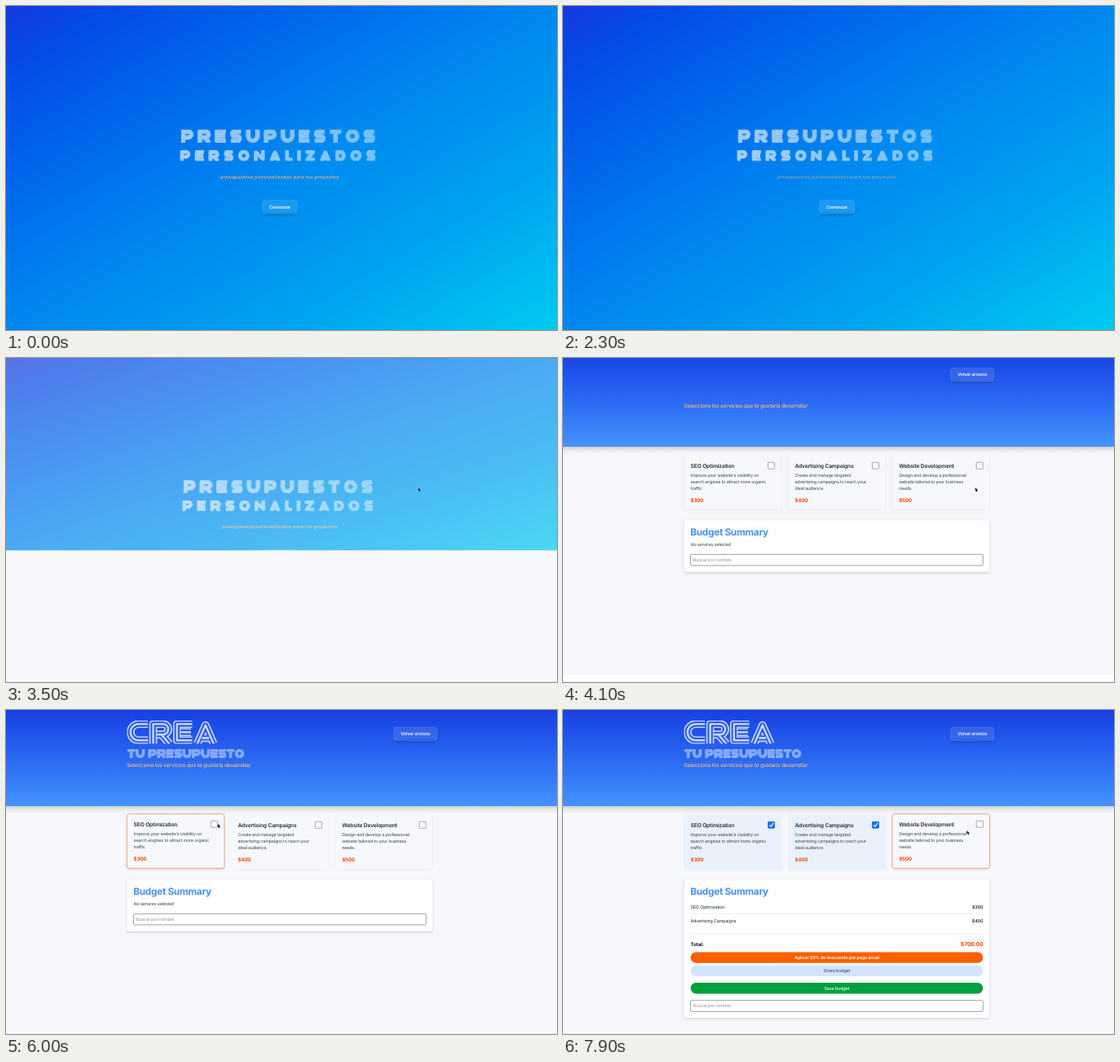
An HTML page that plays this animation: 676x398 px, repeating every 8000 ms.

```html
<!DOCTYPE html>
<html lang="es">
<head>
<meta charset="utf-8">
<title>Presupuestos personalizados</title>
<style>
html, body { margin: 0; width: 100%; height: 100%; overflow: hidden; background: #fff; }
svg { display: block; width: 676px; height: 398px; }
text {
  font-family: Inter, "Liberation Sans", sans-serif; letter-spacing: -.025em;
  white-space: pre; text-rendering: geometricPrecision;
}
</style>
</head>
<body>
<svg id="stage" viewBox="0 0 676 398" xmlns="http://www.w3.org/2000/svg">
  <defs>
    <linearGradient id="sky" x1="0" y1="0" x2="1" y2="1">
      <stop offset="0" stop-color="#1738e0"/>
      <stop offset=".09" stop-color="#064ae6"/>
      <stop offset=".27" stop-color="#0066ec"/>
      <stop offset=".5" stop-color="#0088f0"/>
      <stop offset=".75" stop-color="#00a4f0"/>
      <stop offset="1" stop-color="#00caf0"/>
    </linearGradient>
    <linearGradient id="head" x1="0" y1="0" x2="0" y2="1">
      <stop offset="0" stop-color="#1640e3"/>
      <stop offset=".5" stop-color="#2a68f3"/>
      <stop offset="1" stop-color="#4593ff"/>
    </linearGradient>
    <linearGradient id="shade" x1="0" y1="0" x2="0" y2="1">
      <stop offset="0" stop-color="#000" stop-opacity=".17"/>
      <stop offset=".4" stop-color="#000" stop-opacity=".07"/>
      <stop offset="1" stop-color="#000" stop-opacity="0"/>
    </linearGradient>
    <linearGradient id="ink">
      <stop offset="0" stop-color="#fff" stop-opacity=".72"/>
      <stop offset="1" stop-color="#fff" stop-opacity=".52"/>
    </linearGradient>
    <filter id="soft" x="-20%" y="-200%" width="140%" height="500%">
      <feGaussianBlur stdDeviation="1.4"/>
    </filter>
    <clipPath id="fold"><rect id="foldBox" width="676" height="398"/></clipPath>
  </defs>
</svg>
<script>
const NS = 'http://www.w3.org/2000/svg';
const stage = document.getElementById('stage');
const defs = stage.querySelector('defs');
const foldBox = document.getElementById('foldBox');

function el(parent, tag, attrs = {}) {
  const e = document.createElementNS(NS, tag);
  set(e, attrs);
  return parent.appendChild(e);
}
function set(e, attrs) {
  for (const k in attrs) e.setAttribute(k, attrs[k]);
}
const group = (parent, attrs) => el(parent, 'g', attrs);
const box = (parent, x, y, width, height, rx, attrs) =>
  el(parent, 'rect', { x, y, width, height, rx, ...attrs });
function label(parent, str, x, y, size, fill, weight = 400, anchor = 'start', more = {}) {
  const e = el(parent, 'text', {
    x, y, fill, 'font-size': size, 'font-weight': weight, 'text-anchor': anchor, ...more
  });
  e.textContent = str;
  return e;
}

// Display letters: width and centre line in a box 20 units high
const glyphs = {
  ' ': [5, ''],
  A: [20, 'M3 20L10 4L17 20M7 15H13'],
  C: [18, 'M18 3H10A7 7 0 0 0 10 17H18'],
  D: [18, 'M3 3H8A7 7 0 0 1 8 17H3Z'],
  E: [16, 'M16 3H3V17H16M6 10H15'],
  I: [6, 'M3 0V20'],
  L: [13, 'M3 0V17H13'],
  N: [19, 'M3 20V4L16 16V0'],
  O: [20, 'M10 3A7 7 0 0 1 10 17A7 7 0 0 1 10 3'],
  P: [18.5, 'M3 20V3H11A4.5 4.5 0 0 1 11 12H6'],
  R: [19, 'M3 20V3H11.5A4.5 4.5 0 0 1 11.5 12H6M10 12L17 20'],
  S: [17, 'M16 3H6.5A3.5 3.5 0 0 0 6.5 10H10.5A3.5 3.5 0 0 1 10.5 17H1'],
  T: [17, 'M0 3H17M8.5 6V20'],
  U: [20, 'M3 0V10A7 7 0 0 0 17 10V0'],
  Z: [17, 'M0 3H14L3 17H17']
};

function word(parent, str, x, y, w, h, fill, groove) {
  const id = 'w' + defs.childElementCount;
  const s = h / 20;
  const mask = el(defs, 'mask', { id });
  const sum = [...str].reduce((n, c) => n + glyphs[c][0], 0);
  const gap = (w / s - sum) / (str.length - 1);
  let pos = 0;
  for (const c of str) {
    const g = group(mask, { transform: `translate(${x + pos * s} ${y}) scale(${s})` });
    for (const [width, stroke] of [[6.8, '#fff'], [4.4, groove], [1.8, '#fff']])
      el(g, 'path', {
        d: glyphs[c][1], fill: 'none', stroke, 'stroke-width': width, 'stroke-linejoin': 'round'
      });
    pos += glyphs[c][0] + gap;
  }
  box(parent, x, y, w, h, 0, { fill, mask: `url(#${id})`, role: 'img', 'aria-label': str });
}

function glassButton(parent, str, x, y, w, h) {
  box(parent, x + 1, y + h - .5, w - 2, 2.5, 1, { fill: '#023', opacity: .3, filter: 'url(#soft)' });
  box(parent, x, y, w, h, 4, {
    fill: '#fff', 'fill-opacity': .1, stroke: '#fff', 'stroke-opacity': .2, 'stroke-width': .6
  });
  label(parent, str, x + w / 2, y + h / 2 + 2, 5.45, '#fff', 600, 'middle');
}

// Landing view
const landing = group(stage);
box(landing, 0, 0, 676, 398, 0, { fill: '#f5f7fb' });
const hero = group(landing, { 'clip-path': 'url(#fold)' });
const sky = box(hero, 0, 0, 676, 398, 0, { fill: 'url(#sky)' });
const heroText = group(hero);
word(heroText, 'PRESUPUESTOS', 214.7, 151.7, 238, 16.3, 'url(#ink)', '#aaa');
word(heroText, 'PERSONALIZADOS', 213.5, 177.1, 240, 13.4, 'url(#ink)', '#bbb');
const tagline = label(heroText, 'presupuestos personalizados para tus proyectos',
  335.8, 212.2, 5.45, '#ffb86a', 700, 'middle', { style: 'letter-spacing:.35px' });
glassButton(heroText, 'Comenzar', 314.7, 238.7, 42.4, 16.4);

// Budget view
const page = group(stage);
box(page, 0, 0, 676, 398, 0, { fill: '#f6f7fb' });
box(page, 0, 118, 676, 9, 0, { fill: 'url(#shade)' });
box(page, 0, 0, 676, 118, 0, { fill: 'url(#head)' });
const title = group(page);
word(title, 'CREA', 148.5, 13, 110.5, 28.5, 'rgba(255,255,255,.75)', '#000');
word(title, 'TU PRESUPUESTO', 149, 48, 143, 11, 'rgba(255,255,255,.52)', '#aaa');
label(page, 'Selecciona los servicios que te gustaría desarrollar', 148.2, 70.2, 6.6, '#ffb86a', 500);
glassButton(page, 'Volver al inicio', 475.8, 21.2, 53, 16.4);

const services = [
  ['SEO Optimization', 300, 'Improve your website\'s visibility on', 'search engines to attract more organic', 'traffic.'],
  ['Advertising Campaigns', 400, 'Create and manage targeted', 'advertising campaigns to reach your', 'ideal audience.'],
  ['Website Development', 500, 'Design and develop a professional', 'website tailored to your business', 'needs.']
];
const cardX = i => 148.3 + i * 127.8;

const cards = services.map(([name, price, ...lines], i) => {
  const x = cardX(i);
  const g = group(page);
  const shadow = box(g, x, 129.8, 119.6, 66.6, 3, { fill: '#000', filter: 'url(#soft)' });
  const back = box(g, x, 128.6, 119.6, 67, 3, { 'stroke-width': .8 });
  label(g, name, x + 8.3, 144.4, 6.7, '#242c3a', 600);
  lines.forEach((s, k) => label(g, s, x + 8.3, 155.1 + k * 8, 5.35, '#364153'));
  label(g, '$' + price, x + 8.3, 185.5, 6.2, '#f54a00', 700);
  const check = box(g, x + 103.3, 137.2, 8, 8, .6, { 'stroke-width': .7 });
  const tick = el(g, 'path', {
    d: `M${x + 105} 141.4l1.7 1.8l3.2-4.3`, fill: 'none', stroke: '#fff', 'stroke-width': 1.2
  });
  return { g, shadow, back, check, tick };
});

const panelShadow = box(page, 148.3, 209, 375.2, 64, 3, { fill: '#000', opacity: .16, filter: 'url(#soft)' });
const panel = box(page, 148.3, 207.8, 375.2, 64, 3, { fill: '#fefefe', stroke: '#e6e9ef', 'stroke-width': .5 });
label(page, 'Budget Summary', 156.3, 226.6, 11.8, '#4792f2', 700);
const empty = label(page, 'No services selected', 156.5, 240.2, 5.65, '#364153', 400, 'start',
  { style: 'font-family:"Liberation Sans",sans-serif;font-style:italic' });

const rule = (parent, y) => box(parent, 156.5, y, 359, .6, 0, { fill: '#e3e6eb' });
const rows = services.slice(0, 2).map(([name, price], i) => {
  const g = group(page);
  const y = 244.2 + i * 16.4;
  label(g, name, 156.5, y, 5.35, '#1e2939');
  label(g, '$' + price, 515.4, y, 5.35, '#1e2939', 600, 'end');
  if (!i) rule(g, 250.3);
  return g;
});

const pill = (parent, str, y, fill, ink, weight) => {
  box(parent, 156.5, y, 358.8, 13.4, 6.7, { fill });
  label(parent, str, 335.9, y + 8.6, 5.4, ink, weight, 'middle');
};
const totals = group(page);
rule(totals, 274.8);
label(totals, 'Total:', 156.5, 289.6, 6.1, '#101828', 700);
const sum = label(totals, '', 515.5, 289.9, 6.9, '#f54a00', 700, 'end');
pill(totals, 'Aplicar 20% de descuento por pago anual', 297.4, '#ff5f00', '#fff', 600);
pill(totals, 'Share budget', 313.7, '#d4e4fc', '#1c398e', 400);
pill(totals, 'Save budget', 335, '#00a03e', '#fff', 500);

const search = group(page);
box(search, 156.5, 250.3, 358.8, 13.6, 1.5, { fill: '#fff', stroke: '#858a93', 'stroke-width': .8 });
label(search, 'Buscar por nombre', 159.8, 259.1, 5.4, '#8d929a');

const pointer = el(stage, 'path', {
  d: 'M0 0V4.6L1.1 3.7L1.9 5.4L2.8 5L2 3.4H3.4Z',
  fill: '#0b0f1c', stroke: '#fff', 'stroke-width': .5, 'paint-order': 'stroke'
});

// Motion
const clamp = v => Math.min(1, Math.max(0, v));
const ramp = (t, a, b) => clamp((t - a) / (b - a));
const ease = v => v * v * (3 - 2 * v);
const out = v => 1 - (1 - v) ** 3;
const mix = (a, b, v) => a + (b - a) * v;

const stops = [
  [2350, 541, 84], [2800, 505.8, 159.2], [4950, 505.8, 159.2], [5800, 259.8, 139.8],
  [6700, 259.8, 139.8], [7250, 384.5, 140], [7560, 384.5, 140], [7880, 495.5, 148]
];
const clicks = [6300, 7480];

function cursor(t) {
  let [, x, y] = stops[0];
  for (let i = 1; i < stops.length; i++) {
    const [a] = stops[i - 1], [b, nx, ny] = stops[i];
    const v = ease(ramp(t, a, b));
    x = mix(x, nx, v);
    y = mix(y, ny, v);
  }
  return [x, y];
}

// Averaging the recent past gives the short hover transition
function hover(t, i) {
  let n = 0;
  for (let k = 0; k < 6; k++) {
    const past = t - k * 28;
    const [x, y] = cursor(past);
    const dx = x - cardX(i);
    if (past > 4220 && dx > 0 && dx < 119.6 && y > 128 && y < 196) n++;
  }
  return n / 6;
}

const show = (e, on) => set(e, { visibility: on ? 'visible' : 'hidden' });

function drawLanding(t) {
  show(landing, t < 4000);
  const p = ramp(t, 3000, 3850);
  const h = mix(398, 124, p);
  const s = 1 - .0425 * p;
  set(sky, { height: h });
  set(foldBox, { height: h });
  set(hero, { opacity: t < 3500 ? 1 - .3 * ramp(t, 3000, 3500) : .7 * (1 - ramp(t, 3500, 3900)) });
  set(heroText, { transform: `translate(334 90) scale(${s}) translate(-334 -90)` });
  const dim = ease(ramp(t, 1400, 2250)) - ease(ramp(t, 2320, 2850));
  set(tagline, { opacity: .84 - .34 * dim });
}

function drawPage(t) {
  show(page, t > 3700);
  set(page, {
    opacity: ramp(t, 3700, 3950),
    transform: `translate(0 ${-9 * (1 - ease(ramp(t, 4110, 4450)))})`
  });
  const s = mix(.88, 1, out(ramp(t, 4150, 5550)));
  set(title, {
    opacity: ramp(t, 4150, 4800),
    transform: `translate(213 36) scale(${s}) translate(-213 -36)`
  });

  cards.forEach((c, i) => {
    const h = hover(t, i);
    const on = i < 2 && t >= clicks[i];
    const v = on ? ramp(t, clicks[i], clicks[i] + 150) : 0;
    const tone = (a, b, w) => Math.round(mix(a, b, w));
    set(c.g, { transform: `translate(0 ${-1 * h})` });
    set(c.shadow, { opacity: .02 + .13 * h });
    set(c.back, {
      fill: `rgb(${tone(247, 233, v)},${tone(248, 241, v)},${tone(252, 253, v)})`,
      stroke: `rgb(${tone(238, 243, h)},${tone(240, 146, h)},${tone(245, 104, h)})`
    });
    set(c.check, { fill: on ? '#0b6cf2' : '#fff', stroke: on ? '#0b6cf2' : '#7d818a' });
    show(c.tick, on && t > 3700);
  });

  const count = clicks.filter(c => t >= c).length;
  const live = t > 3700;
  const lift = (count - 2) * 16.4;
  show(empty, live && !count);
  rows.forEach((r, i) => show(r, live && i < count));
  show(totals, live && count > 0);
  set(totals, { transform: `translate(0 ${lift})` });
  sum.textContent = '$' + services.slice(0, count).reduce((n, s) => n + s[1], 0).toFixed(2);
  set(search, { transform: `translate(0 ${count ? 106.4 + lift : 0})` });
  const height = count ? 170.6 + lift : 64.2;
  set(panel, { height });
  set(panelShadow, { height });
}

function draw(t) {
  drawLanding(t);
  drawPage(t);
  show(pointer, t > 2350);
  set(pointer, { transform: `translate(${cursor(t).join(' ')})` });
}

function tick() {
  draw(performance.now() % 8000);
  requestAnimationFrame(tick);
}
tick();
</script>
</body>
</html>
```
